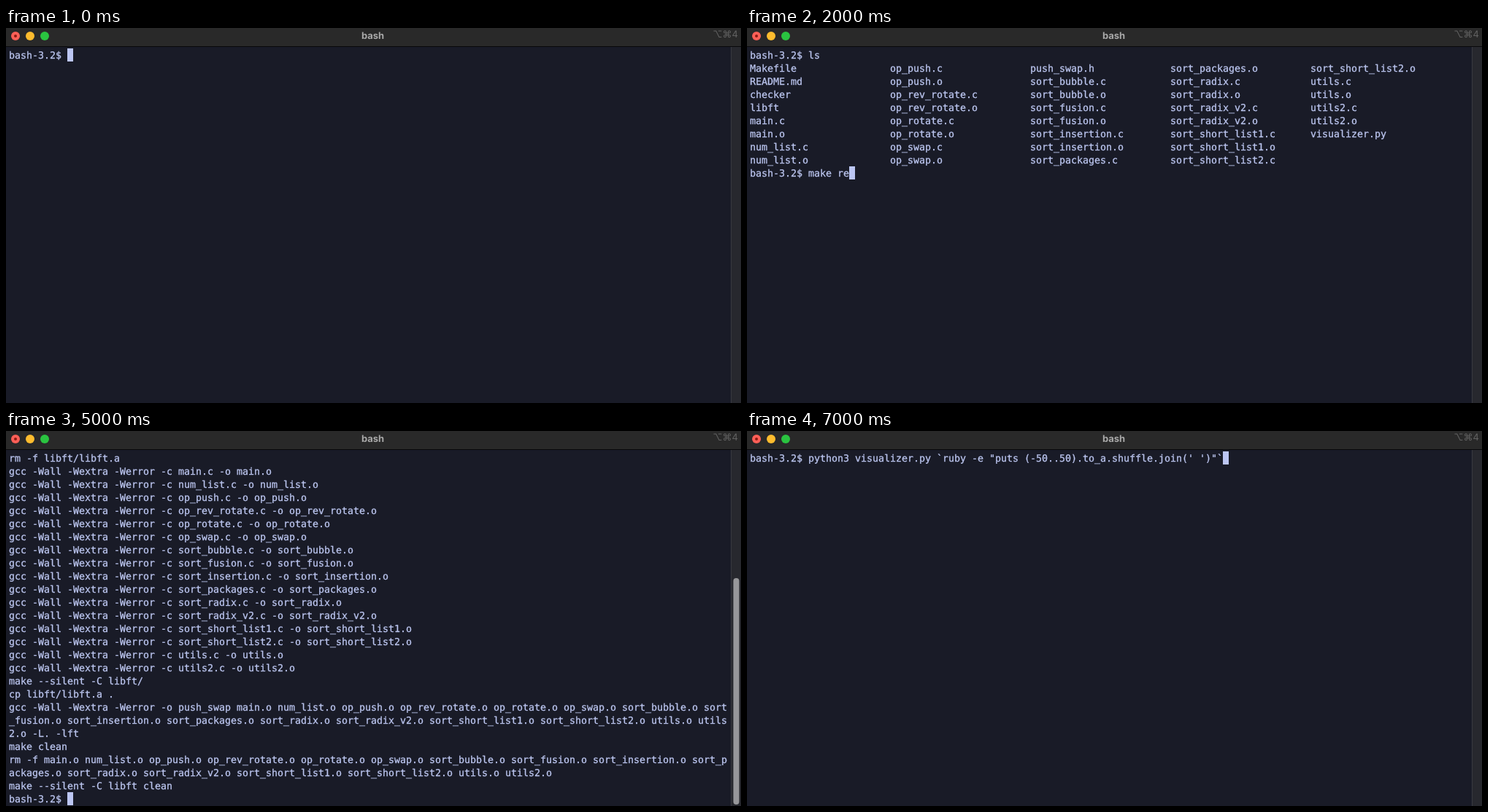
Write an HTML page that moves like this. It is 1007 px wide and 515 px high and loops after 8 s.

```html
<!DOCTYPE html>
<html lang="en">
<head>
<meta charset="utf-8">
<title>bash</title>
<style>
  html, body { margin: 0; width: 100%; height: 100%; overflow: hidden; background: #191b27; }
  svg { display: block; width: 100%; height: 100%; }
  text { white-space: pre; text-rendering: geometricPrecision; }
  #rows text {
    font-family: "DejaVu Sans Mono", monospace;
    font-size: 13.289px;
    fill: #bcc6f0;
    stroke: #bcc6f0;
    stroke-width: .3;
  }
  .bar { font-family: Inter, "DejaVu Sans", sans-serif; font-size: 13px; }
</style>
</head>
<body>
<svg viewBox="0 0 1007 515">
  <rect width="1007" height="515" fill="#191b27"/>
  <rect x="993" y="26" width="14" height="489" fill="#27282e"/>
  <rect x="993" y="26" width="1" height="489" fill="#393a40"/>
  <rect id="thumb" x="996.5" width="8" rx="4" fill="#97979a"/>
  <rect width="1007" height="25" fill="#292929"/>
  <rect y="25" width="1007" height="1" fill="#08080a"/>
  <circle cx="13" cy="11" r="6" fill="#ff5f57"/>
  <circle cx="13" cy="11" r="2" fill="#8a1a14"/>
  <circle cx="33" cy="11" r="6" fill="#febc2e"/>
  <circle cx="53" cy="11" r="6" fill="#2ac340"/>
  <text class="bar" x="502.5" y="15" text-anchor="middle" font-weight="700" fill="#a8a8a8">bash</text>
  <text class="bar" x="1003" y="13" text-anchor="end" fill="#626262">⌥⌘4</text>
  <rect id="cursor" width="8" height="18" fill="#bcc6f3"/>
  <g id="rows"></g>
</svg>
<script>
const COLS = 123, ROWS = 27, CELL = 8, LINE = 18, LEFT = 4, TOP = 28;
const STEP = 1000, LOOP = 8000;
const PROMPT = 'bash-3.2$ ';

const mods = ('main num_list op_push op_rev_rotate op_rotate op_swap sort_bubble sort_fusion ' +
  'sort_insertion sort_packages sort_radix sort_radix_v2 sort_short_list1 sort_short_list2 ' +
  'utils utils2').split(' ');
const objs = mods.map(m => m + '.o').join(' ');

// Column-major listing, as ls prints it
function listing() {
  const names = ['Makefile', 'README.md', 'checker', 'libft', 'push_swap.h', 'visualizer.py']
    .concat(mods.flatMap(m => [m + '.c', m + '.o'])).sort();
  const n = 8;
  return Array.from({ length: n }, (_, r) =>
    names.filter((_, i) => i % n === r).map(s => s.padEnd(24)).join('').trimEnd());
}

function wrap(line) {
  const out = [];
  for (let i = 0; i < line.length; i += COLS) out.push(line.slice(i, i + COLS));
  return out;
}

const clean = ['rm -f ' + objs, 'make --silent -C libft clean'];
const log = [
  PROMPT + 'ls', ...listing(),
  PROMPT + 'make re', ...clean,
  'rm -f push_swap', 'rm -f libft.a', 'rm -f libft/libft.a',
  ...mods.map(m => `gcc -Wall -Wextra -Werror -c ${m}.c -o ${m}.o`),
  'make --silent -C libft/', 'cp libft/libft.a .',
  `gcc -Wall -Wextra -Werror -o push_swap ${objs} -L. -lft`,
  'make clean', ...clean, PROMPT
].flatMap(wrap);

const upTo = n => [...log.slice(0, n), ''];
const command = `python3 visualizer.py \`ruby -e "puts (-50..50).to_a.shuffle.join(' ')"\``;

// One screen per step; the cursor follows the last line
const screens = [
  { lines: [PROMPT] },
  { lines: upTo(6) },
  { lines: log.slice(0, 10) },
  { lines: upTo(25) },
  { lines: upTo(33), thumb: 129 },
  { lines: log, thumb: 202 },
  { lines: [PROMPT] },
  { lines: [PROMPT + command] }
];

const $ = id => document.getElementById(id);
const set = (el, attrs) => { for (const k in attrs) el.setAttribute(k, attrs[k]); };

// Every character starts on its own terminal cell
const cells = Array.from({ length: COLS }, (_, c) => LEFT + c * CELL).join(' ');
const rows = Array.from({ length: ROWS }, (_, i) => {
  const el = document.createElementNS('http://www.w3.org/2000/svg', 'text');
  set(el, { x: cells, y: TOP + 14 + i * LINE });
  return $('rows').appendChild(el);
});

function draw({ lines, thumb }) {
  const view = lines.slice(-ROWS), last = view.length - 1;
  rows.forEach((el, i) => { el.textContent = view[i] || ''; });
  set($('cursor'), { x: LEFT + view[last].length * CELL, y: TOP + last * LINE });
  set($('thumb'), { y: thumb || 0, height: thumb ? 513 - thumb : 0 });
}

let shown = -1;
function tick() {
  const i = Math.floor(performance.now() % LOOP / STEP);
  if (i !== shown) draw(screens[shown = i]);
  requestAnimationFrame(tick);
}
tick();
</script>
</body>
</html>
```
